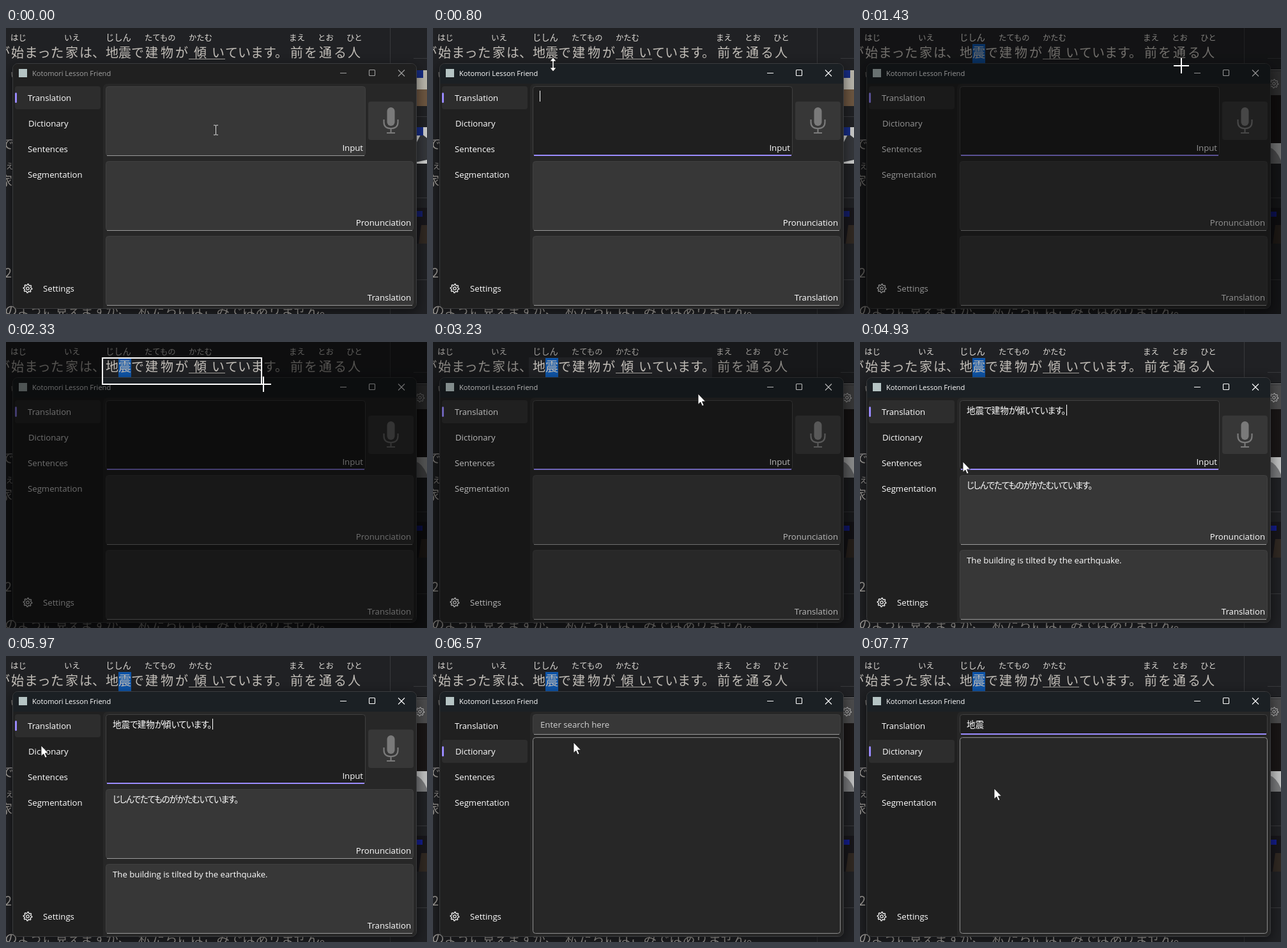
These frames come from a looping animation (659x447 px, 8 s). An HTML page:

```html
<!DOCTYPE html>
<html lang="ja">
<head>
<meta charset="utf-8">
<style>
html, body { margin: 0; width: 100%; height: 100%; overflow: hidden; background: #202124; }
svg { display: block; width: 659px; height: 447px; }
text { white-space: pre; }
.ui { font: 500 13.2px "Open Sans", "Noto Sans", sans-serif; fill: #fff; }
.title { font: 500 11.1px "Open Sans", "Noto Sans", sans-serif; }
.ja { font-family: "Noto Sans CJK JP", "Noto Sans CJK", sans-serif; }
.field { font-size: 13.5px; font-weight: 500; font-feature-settings: "palt"; fill: #fff; }
.kana { font-size: 13.5px; letter-spacing: -1.2px; }
#kanjiText .kana { letter-spacing: -.8px; }
</style>
</head>
<body>
<svg id="stage" viewBox="0 0 659 447" xmlns="http://www.w3.org/2000/svg">
  <defs>
    <filter id="blur" x="-20%" y="-20%" width="140%" height="140%"><feGaussianBlur stdDeviation="9"/></filter>
  </defs>

  <rect width="659" height="447" fill="#202124"/>
  <rect id="mark" x="176" y="25" width="20" height="30" fill="#0f55a8"/>
  <g id="page" class="ja" fill="#c2beb8"></g>
  <path d="M286 48.5H343" stroke="#aaa7a2"/>
  <path d="M0 175.5H11" stroke="#77757a"/>
  <path d="M601.5 0V447M638 47.5H659M638 138.5H659M638 265.5H659M638 393.5H659" stroke="#38393c" fill="none"/>

  <g id="thumbsA">
    <rect x="640" y="66" width="19" height="56" fill="#b9b5ab"/>
    <rect x="640" y="96" width="19" height="26" fill="#6c5540"/>
    <rect x="640" y="66" width="13" height="12" fill="#172c83"/>
    <rect x="640" y="155" width="19" height="57" fill="#c9cac9"/>
    <path d="M640 184L650 165L659 172V206L640 210Z" fill="#34363a"/>
    <rect x="640" y="155" width="13" height="13" fill="#172c83"/>
    <rect x="640" y="281" width="19" height="56" fill="#17161a"/>
    <path d="M646 337L650 308H659V337Z" fill="#302822"/>
    <rect x="640" y="286" width="12" height="9" fill="#141d66"/>
  </g>
  <g id="thumbsB">
    <path d="M640 65.5H659" stroke="#888"/>
    <rect x="640" y="67" width="19" height="38" fill="#4b4b4c"/>
    <rect x="640" y="105" width="19" height="75" fill="#191616"/>
    <rect x="640" y="180" width="19" height="32" fill="#bfc0c0"/>
    <path d="M640 186Q652 190 659 207V212H640Z" fill="#77787a"/>
    <rect x="640" y="281" width="19" height="56" fill="#17161a"/>
    <path d="M646 337L650 308H659V337Z" fill="#302822"/>
    <rect x="640" y="287" width="12" height="8" fill="#141d8a"/>
    <path class="gear" transform="translate(648 87)" fill="none" stroke="#ccc"/>
  </g>

  <rect x="9" y="60" width="635" height="384" rx="10" fill="#000" opacity=".5" filter="url(#blur)"/>
  <rect x="10.5" y="55.5" width="632" height="383" rx="8" fill="#202020" stroke="#3b3c3e"/>
  <path id="bar" d="M11 87V64Q11 56 19 56H634Q642 56 642 64V87Z" fill="#202020"/>
  <rect x="20" y="64" width="13" height="13" fill="#b5c4c4"/>
  <g id="chrome">
    <text class="title" x="41" y="75">Kotomori Lesson Friend</text>
    <path d="M523 70.5H533M569.5 65.5H576.5Q577.5 65.5 577.5 66.5V73.5Q577.5 74.5 576.5 74.5H569.5Q568.5 74.5 568.5 73.5V66.5Q568.5 65.5 569.5 65.5ZM614 65.5L624 75.5M624 65.5L614 75.5" fill="none" stroke="currentColor" stroke-width="1.1"/>
  </g>
  <path d="M152 438V95Q152 87 160 87H642V430Q642 438 634 438Z" fill="#272727"/>
  <g id="pill">
    <rect x="14" y="91" width="134" height="36" rx="4" fill="#2d2d2d"/>
    <rect id="tick" x="14" y="101" width="3" height="16" rx="1.5" fill="#998aff"/>
  </g>
  <g class="ui">
    <text x="34" y="114">Translation</text>
    <text x="35" y="154">Dictionary</text>
    <text x="34" y="194">Sentences</text>
    <text x="34" y="234">Segmentation</text>
    <text x="58" y="412">Settings</text>
  </g>
  <path class="gear" transform="translate(34 407)" fill="none" stroke="#fff" stroke-width="1.2"/>

  <g id="translate">
    <g id="input"></g>
    <g id="pron"></g>
    <g id="trans"></g>
    <g class="ui" text-anchor="end">
      <text x="559" y="192">Input</text>
      <text x="634" y="309">Pronunciation</text>
      <text x="634" y="426">Translation</text>
    </g>
    <rect x="567" y="115" width="71" height="60" rx="4" fill="#373737"/>
    <rect x="596.5" y="124" width="12" height="29" rx="6" fill="#7a7a7a"/>
    <path d="M591.5 143V147Q591.5 157 602.5 157T613.5 147V143M602.5 157V164M596 164H609" fill="none" stroke="#7a7a7a" stroke-width="2.2"/>
    <g id="result">
      <text id="kanjiText" class="ja field" x="167" y="112"></text>
      <text id="kanaText" class="ja field" x="167" y="229"></text>
      <text class="ui" x="167" y="346">The building is tilted by the earthquake.</text>
    </g>
  </g>

  <g id="dictionary">
    <g id="search"></g>
    <text id="hint" class="ui" x="168" y="112" style="fill:#d0d0d0">Enter search here</text>
    <text id="query" class="ja field" x="167" y="112">地震</text>
    <rect x="156.5" y="127.5" width="481" height="306" rx="4" fill="#272727" stroke="#8c8c8c"/>
  </g>
  <rect id="caret" y="98" width="1" height="17" fill="#fff"/>

  <path id="dim" fill="#000" fill-rule="evenodd"/>
  <rect id="frame" fill="none" stroke="#fff" stroke-width="2"/>
  <g id="pointer">
    <path data-kind="arrow" d="M0 0V16.5L3.8 13L6.4 19L9 17.9L6.4 12H11.5Z" fill="#fff" stroke="#111" stroke-width=".8"/>
    <path data-kind="beam" d="M-3.5 -7.5H-1Q0 -7.5 0 -6.5Q0 -7.5 1 -7.5H3.5M0 -7V7M-3.5 7.5H-1Q0 7.5 0 6.5Q0 7.5 1 7.5H3.5" fill="none" stroke="#ddd"/>
    <path data-kind="size" d="M0 -11L5 -5H1.2V5H5L0 11L-5 5H-1.2V-5H-5Z" fill="#fff" stroke="#111" stroke-width=".8"/>
    <path data-kind="cross" d="M-12 0H12M0 -12V12" stroke="#fff" stroke-width="2"/>
  </g>
</svg>
<script>
const LOOP = 8000;
const $ = id => document.getElementById(id);
const clamp = v => Math.max(0, Math.min(1, v));
const ramp = (t, a, b) => clamp((t - a) / (b - a));
const easeOut = v => 1 - (1 - v) ** 3;
const smooth = v => v * v * (3 - 2 * v);
const show = (el, on) => { el.style.display = on ? "" : "none"; };
const set = (el, attrs) => { for (const k in attrs) el.setAttribute(k, attrs[k]); };

// Page text: x, baseline, size, words
const words = [
  [-14, 46, 20, "が"], [8, 46, 20, "始"], [29, 46, 20.8, "まった"], [93, 46, 20, "家"], [115, 46, 20, "は、"],
  [156, 46, 20, "地震で"], [218, 46, 20, "建"], [242, 46, 20, "物"], [265, 46, 20, "が"], [294, 46, 20, "傾"],
  [322, 46, 20, "い"], [343, 46, 20, "ています。"], [445, 46, 20, "前"], [467, 46, 20, "を"],
  [490, 46, 20, "通"], [513, 46, 20, "る"], [535, 46, 20, "人"],
  [7, 20, 12.5, "はじ"], [91, 20, 12.5, "いえ"], [156, 20, 13.3, "じしん"], [217, 20, 12.3, "たてもの"],
  [286, 20, 12.3, "かたむ"], [443, 20, 12.5, "まえ"], [488, 20, 12.5, "とお"], [533, 20, 12.5, "ひと"],
  [7, 78, 12, "い"], [-8, 189, 20, "で"], [0, 221, 12, "え"], [-10, 247, 20, "家"], [-2, 390, 20, "2"],
  [-2, 449, 19.8, "のように見えますが、"], [207, 449, 19, "私"], [228, 449, 20.3, "たちにはごみではありません。"]
];
const wordStyle = y => y > 60 ? 'opacity=".8"' : y < 30 ? 'fill="#dedbd6" font-weight="500"' : "";
$("page").innerHTML = words.map(([x, y, size, s]) =>
  `<text x="${x}" y="${y}" font-size="${size}" ${wordStyle(y)}>${s}</text>`).join("");

const withKana = s => s.replace(/[ぁ-ん。]+/g, m => `<tspan class="kana">${m}</tspan>`);
$("kanjiText").innerHTML = withKana("地震で建物が傾いています。");
$("kanaText").innerHTML = withKana("じしんでたてものがかたむいています。");

function gearPath() {
  const points = [];
  for (let i = 0; i < 32; i++) {
    const a = i * Math.PI / 16, r = i % 4 < 2 ? 6.8 : 5;
    points.push((r * Math.cos(a)).toFixed(2) + " " + (r * Math.sin(a)).toFixed(2));
  }
  return "M" + points.join("L") + "ZM2.2 0A2.2 2.2 0 1 1 -2.2 0A2.2 2.2 0 1 1 2.2 0Z";
}
document.querySelectorAll(".gear").forEach(g => g.setAttribute("d", gearPath()));

function makeField(id, y, w, h) {
  const bottom = y + h;
  $(id).innerHTML = `<rect x="156.5" y="${y + .5}" width="${w - 1}" height="${h - 1}" rx="4" stroke="#404040"/>
    <path class="rest" d="M158 ${bottom - .5}H${154 + w}" stroke="#9a9a9a"/>
    <path class="focus" d="M158 ${bottom - 1}H${154 + w}" stroke="#9b8cff" stroke-width="2"/>`;
  const [box, rest, line] = $(id).children;
  return focused => {
    box.setAttribute("fill", focused ? "#1f1f1f" : "#373737");
    show(rest, !focused);
    show(line, focused);
  };
}
const focusInput = makeField("input", 91, 407, 109);
const focusSearch = makeField("search", 91, 482, 32);
makeField("pron", 208, 482, 109)(false);
makeField("trans", 325, 482, 109)(false);

// Pointer path: time, x, y
const route = [
  [30, 328, 159], [230, 216, 110], [400, 216, 110], [800, 188, 57], [1000, 186, 41], [1230, 186, 41],
  [1500, 565, 63], [1800, 565, 63], [1930, 150, 24], [2070, 150, 24], [2330, 403, 66], [2560, 565, 63],
  [2830, 437, 55], [3100, 437, 55], [3230, 415, 81], [3730, 621, 150], [3870, 621, 150],
  [4330, 331, 205], [4470, 331, 205], [4930, 161, 187], [5270, 196, 138], [5300, 196, 138],
  [6100, 44, 140], [6300, 44, 140], [6570, 220, 135], [6740, 225, 107], [7070, 225, 107],
  [7330, 210, 209], [7530, 210, 209], [7700, 210, 207]
];
const kinds = [[0, "beam"], [720, "size"], [880, "beam"], [1230, "cross"], [2930, "arrow"], [6650, "beam"], [7150, "arrow"]];

function pointerAt(t) {
  const i = route.findIndex(p => p[0] >= t);
  if (i < 0) return route.at(-1).slice(1);
  if (i === 0) return route[0].slice(1);
  const [ta, xa, ya] = route[i - 1], [tb, xb, yb] = route[i];
  const k = smooth(ramp(t, ta, tb));
  return [xa + (xb - xa) * k, ya + (yb - ya) * k];
}

function draw(t) {
  const [px, py] = pointerAt(t);
  const active = t >= 450, lookup = t >= 6150, focused = t >= 6710, typed = t >= 7100;
  const picked = t >= 1100, filled = t >= 4100;

  show($("mark"), picked);
  show($("thumbsA"), !picked);
  show($("thumbsB"), picked);
  $("bar").setAttribute("fill", active ? "#1b2024" : "#202020");
  set($("chrome"), { fill: active ? "#fff" : "#a0a0a0", color: active ? "#fff" : "#a0a0a0" });

  $("pill").setAttribute("transform", `translate(0 ${lookup ? 40 : 0})`);
  const stretch = lookup ? 1 - easeOut(ramp(t, 6150, 6400)) : 0;
  set($("tick"), { y: 101 - 10 * stretch, height: 16 + 10 * stretch });

  show($("translate"), !lookup);
  show($("dictionary"), lookup);
  const enter = easeOut(ramp(t, 6150, 6400));
  set($("dictionary"), { transform: `translate(0 ${(1 - enter) * 40})`, opacity: enter });
  focusInput(active);
  focusSearch(focused);
  show($("result"), filled);
  show($("hint"), !typed);
  show($("query"), typed);

  const caretOn = lookup ? focused && t < 7700 : filled || active && t < 1230;
  show($("caret"), caretOn);
  $("caret").setAttribute("x", lookup ? (typed ? 195 : 167) : filled ? 323 : 167);

  const dim = .57 * ramp(t, 1230, 1500) * (1 - ramp(t, 3100, 3360));
  const w = t < 2830 ? px - 152 : 287, h = t < 2830 ? py + 1 - 24 : 31;
  const cut = t >= 2070 && w > 0 && h > 0;
  set($("dim"), {
    d: "M0 0H659V447H0Z" + (cut ? `M150 24h${w}v${h}h${-w}Z` : ""),
    opacity: dim
  });
  show($("dim"), dim > 0);
  show($("frame"), cut && t < 2930);
  if (cut) set($("frame"), { x: 151, y: 25, width: Math.max(0, w - 2), height: Math.max(0, h - 2) });

  const kind = kinds.findLast(k => t >= k[0])[1];
  for (const shape of $("pointer").children) show(shape, shape.dataset.kind === kind);
  const snap = kind === "beam" ? .5 : 0;
  $("pointer").setAttribute("transform", `translate(${Math.round(px) + snap} ${Math.round(py) + snap})`);
}

const start = performance.now();
function tick() {
  draw((performance.now() - start) % LOOP);
  requestAnimationFrame(tick);
}
tick();
</script>
</body>
</html>
```
